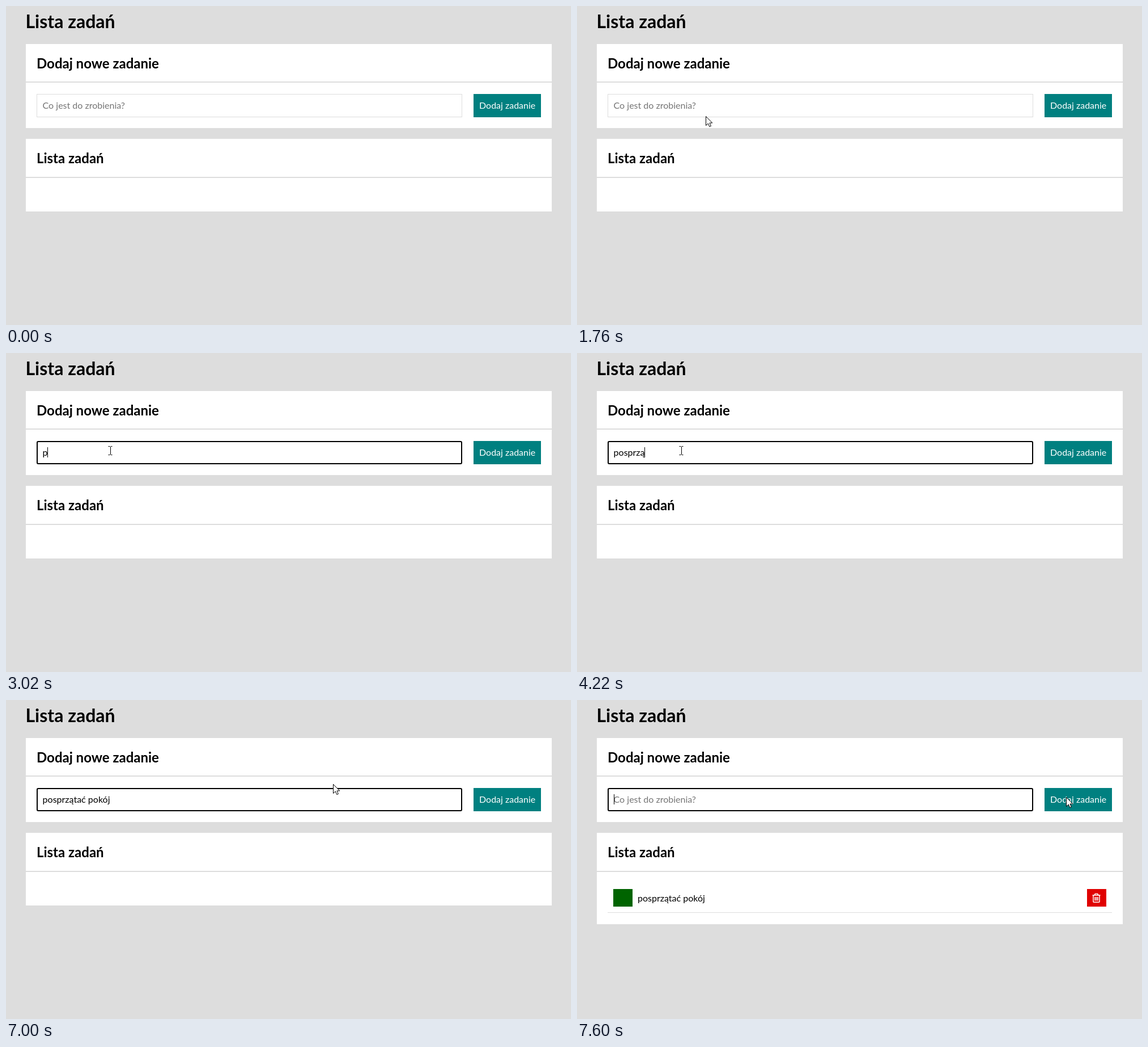
An HTML page for the animation above (8000 ms loop, 997 px wide and 562 px high).

```html
<!DOCTYPE html>
<html lang="pl">
<head>
<meta charset="utf-8">
<title>Lista zadań</title>
<style>
  html, body { margin: 0; width: 100%; height: 100%; overflow: hidden; background: #ddd; }
  svg { display: block; }
  text { font: 16px Lato, sans-serif; white-space: pre; }
  .h1 { font-size: 32px; font-weight: 700; }
  .h2 { font-size: 24px; font-weight: 700; }
  .card { fill: #fff; }
  .line { fill: #ddd; }
</style>
</head>
<body>
<svg width="997" height="562" viewBox="0 0 997 562">
  <rect width="997" height="562" fill="#ddd"/>
  <text class="h1" x="34.5" y="39">Lista zadań</text>

  <rect class="card" x="35" y="67" width="928" height="148"/>
  <rect class="line" x="35" y="133" width="928" height="2"/>
  <text class="h2" x="54" y="110">Dodaj nowe zadanie</text>
  <rect x="54.5" y="155.5" width="750" height="40" fill="#fff" stroke="#ddd"/>
  <rect id="focusRing" x="55" y="156" width="749" height="39" rx="2" fill="#fff" stroke="#000" stroke-width="2"/>
  <text id="placeholder" x="64.6" y="181" fill="#757575">Co jest do zrobienia?</text>
  <text id="typed" x="64.6" y="181"></text>
  <rect id="caret" y="166" width="1" height="18"/>
  <rect x="825" y="155" width="119" height="41" fill="#008080"/>
  <text x="835" y="181" fill="#fff">Dodaj zadanie</text>

  <rect class="card" id="listCard" x="35" y="234" width="928" height="128"/>
  <rect class="line" x="35" y="301" width="928" height="2"/>
  <text class="h2" x="54" y="277">Lista zadań</text>
  <g id="task">
    <rect x="64" y="333" width="34" height="31" fill="#006400"/>
    <text x="107" y="355">posprzątać pokój</text>
    <rect x="900" y="333" width="34" height="31" fill="#e00000"/>
    <path d="M909.5 344h14M913 344l1.2-2.4h4.6l1.2 2.4M911 344v11.3q0 1 1 1h9q1 0 1-1V344M914.1 347v6.5M916.5 347v6.5M918.9 347v6.5"
          fill="none" stroke="#fff" stroke-width="1.5"/>
    <rect class="line" x="54" y="374" width="890" height="1"/>
  </g>

  <path id="arrow" d="M.5.5V16.5L4.3 13 6.8 18.6 9.4 17.5 7 12H11.8Z" fill="#fff" stroke="#000"/>
  <path id="beam" d="M-3.5-7.5h2.5l1 1 1-1h2.5M.5-6.5v13M-3.5 7.5h2.5l1-1 1 1h2.5" fill="none" stroke="#000"/>
  <circle id="click" r="15" fill="#ff0" fill-opacity=".5"/>
</svg>
<script>
const LOOP = 8000, TICK = 200 / 3, BLINK = 530;
const TASK = 'posprzątać pokój';
const KEY_TIMES = [3020, 3160, 3360, 3550, 3750, 3950, 4220, 4410, 4610, 4950, 5150, 5210, 5410, 5610, 5870, 6140];
const FOCUS = 2160, RELEASE = 2230, PRESS = 7530, ADDED = 7600;
const MOVES = [
  { start: 1030, length: 970, from: [795, 489], to: [184, 172] },
  { start: 7000, length: 333, from: [577, 148], to: [863, 171] },
];

const el = id => document.getElementById(id);
const show = (id, on) => el(id).setAttribute('visibility', on ? 'visible' : 'hidden');
const place = (id, x, y) => el(id).setAttribute('transform', `translate(${x} ${y})`);

function pointerAt(t) {
  const { start, length, from, to } = t < MOVES[1].start ? MOVES[0] : MOVES[1];
  const sampled = Math.floor((t - start + 4) / TICK) * TICK;
  const rest = (1 - Math.min(1, sampled / length)) ** 1.88;
  return to.map((end, i) => Math.round(end + (from[i] - end) * rest));
}

function drawPointer(t) {
  const [x, y] = pointerAt(t);
  const visible = t >= MOVES[0].start;
  const overInput = x > 54 && x < 805 && y > 155 && y < 194;
  place('arrow', x, y);
  place('beam', x, y);
  place('click', x - 1, y);
  show('arrow', visible && !overInput);
  show('beam', visible && overInput);
  show('click', t >= FOCUS && t < RELEASE || t >= PRESS && t < ADDED);
}

function drawInput(t) {
  const added = t >= ADDED;
  const keys = KEY_TIMES.filter(time => time <= t);
  const value = added ? '' : TASK.slice(0, keys.length);
  const focused = t >= FOCUS && t < PRESS || added;
  const lastInput = added ? ADDED : keys.length ? keys[keys.length - 1] : FOCUS;
  el('typed').textContent = value;
  show('placeholder', !value);
  show('focusRing', focused);
  show('caret', focused && (t - lastInput) % (2 * BLINK) < BLINK);
  const width = value ? el('typed').getComputedTextLength() : 0;
  el('caret').setAttribute('x', value ? Math.floor(64.6 + width) : 65);
}

function drawList(t) {
  const added = t >= ADDED;
  show('task', added);
  el('listCard').setAttribute('height', added ? 161 : 128);
}

function frame() {
  const t = performance.now() % LOOP;
  drawInput(t);
  drawList(t);
  drawPointer(t);
  requestAnimationFrame(frame);
}
frame();
</script>
</body>
</html>
```
